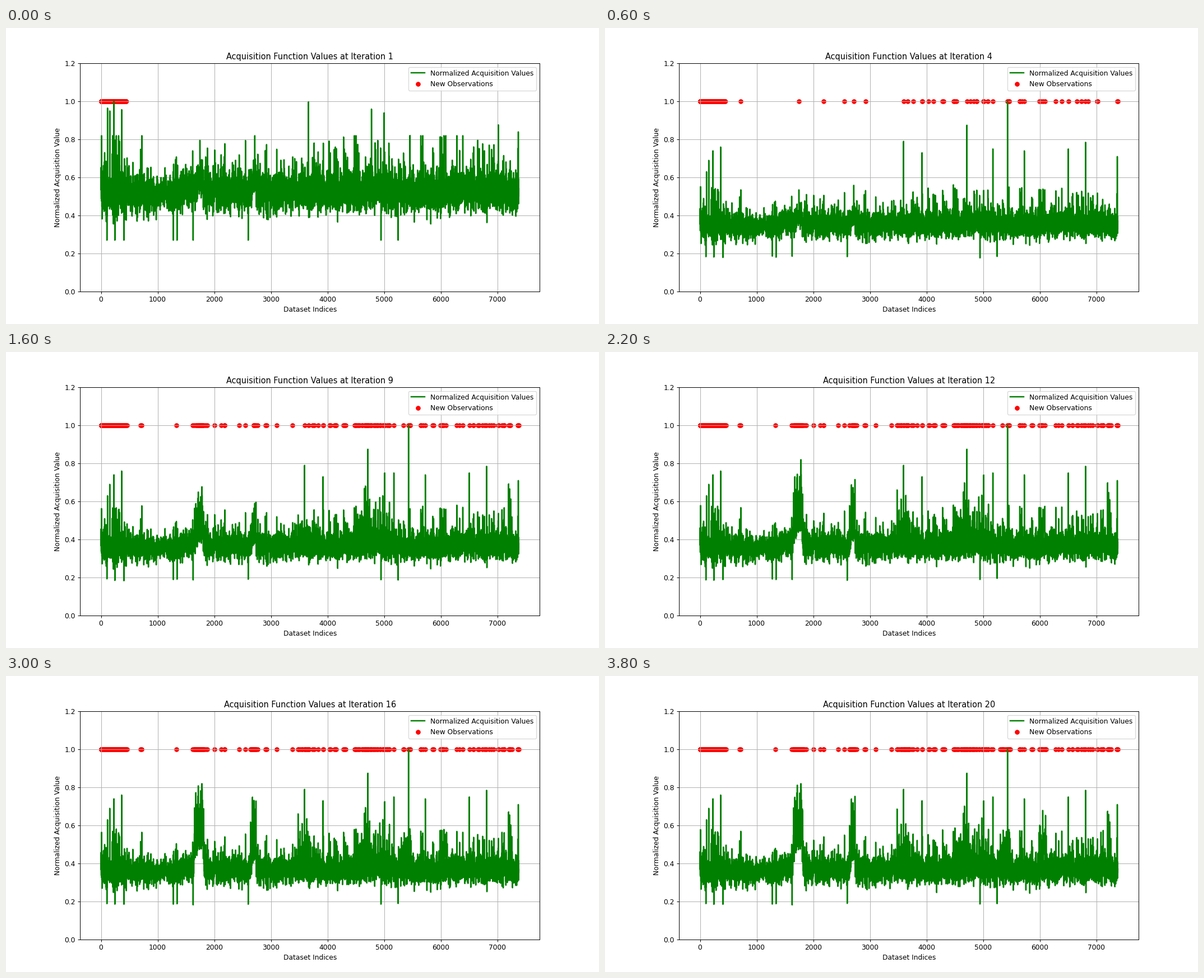
Recreate the animation shown at these times as a matplotlib script. Size 1058x529 px, loop 4000 ms.

```python
import numpy as np
import matplotlib.pyplot as plt
from matplotlib.animation import FuncAnimation

N = 7380
STEPS = 20
START = 441          # samples observed before the first step
BATCH = 16           # samples observed per step
PEAK = 5431          # maximum from step 2 on
idx = np.arange(N)
rng = np.random.default_rng(11)

# (sample, height) of the few landmark spikes
FIRST = [(115, .965), (155, .95), (228, 1), (365, .957), (3665, .998),
         (4777, .96), (5000, .94), (7017, .877), (7370, .84)]
LATER = [(115, .63), (155, .69), (228, .74), (365, .76), (3595, .79),
         (3921, .73), (4713, .875), (PEAK, 1), (5173, .75), (5728, .74),
         (6505, .75), (6810, .785), (7370, .71)]
DIPS = [105, 245, 405, 1277, 1343, 1627, 2600, 4945, 5247]

# stretches that grow spikes: from, to, height, power, first step
CLUSTERS = [(1640, 1830, .29, 7, 4), (2635, 2748, .28, 7, 6),
            (3470, 3720, .31, 14, 5), (4520, 5180, .28, 22, 2),
            (5300, 5480, .25, 12, 10), (6000, 6120, .32, 14, 11),
            (7080, 7260, .34, 16, 2)]


def ramp(x, a, b):
    return np.clip((x - a) / (b - a), 0, 1)


def box(a, b, soft=8):
    return ramp(idx, a - soft, a + soft) * (1 - ramp(idx, b - soft, b + soft))


def put(values, spikes):
    for i, height in spikes:
        values[i] = height
    return values


def make_base():
    # spread differs by region and wanders slowly along the axis
    up = 1 + .4 * box(0, 440) - .15 * box(440, 1250) + .22 * box(3480, N + 50)
    down = 1 + .35 * box(0, 440)
    knots = np.arange(0, N + 40, 40)
    up *= np.interp(idx, knots, rng.lognormal(0, .16, len(knots)))
    down *= np.interp(idx, knots, rng.lognormal(0, .1, len(knots)))

    z = rng.normal(size=N)
    tail = rng.exponential(.055, N) * (rng.random(N) < .05)
    dip = rng.exponential(.035, N) * (rng.random(N) < .012)
    rare = .24 * rng.random(N) ** 60
    noise = np.where(z < 0, .045 * down * z - dip, .043 * up * z + up * tail)
    centre = (.52 + .08 * box(1705, 1800) + .065 * box(2665, 2740)
              + .03 * box(2000, 2050) + .015 * box(1420, 1700))
    base = np.clip(centre + noise + up * rare, .31, .82)
    return put(base, [(i, .27) for i in DIPS])


base = make_base()
mix = rng.random(N)


def growth(k):
    extra = (.12 * ramp(k, 7, 15) * box(1645, 1820)
             + .05 * ramp(k, 7, 14) * box(2645, 2742))
    for a, b, height, power, start in CLUSTERS:
        extra += height * ramp(k, start, start + 7) * mix ** power * box(a, b)
    return extra


def acquisition(k):
    if k == 1:
        return put(base.copy(), FIRST)
    scale = .67 + .025 * ramp(k, 4, 7)
    wobble = np.random.default_rng(k).normal(1, .015, N)
    values = np.minimum((scale * base + growth(k)) * wobble, .82)
    return put(values, LATER)


def observe():
    """Each step observes the best samples of the step before."""
    seen = np.zeros(N, bool)
    seen[:START] = True
    history = [np.flatnonzero(seen)]
    for k in range(1, STEPS):
        score = np.where(seen, -1, acquisition(k))
        seen[np.argsort(score)[-BATCH:]] = True
        seen[-1] = True
        history.append(np.flatnonzero(seen))
    return history


history = observe()

fig, ax = plt.subplots(figsize=(12, 6), dpi=1058 / 12)
line, = ax.plot(idx, base, color="green", lw=2,
                label="Normalized Acquisition Values")
dots = ax.scatter([0], [1], color="red", label="New Observations")
ax.set_xlim(-.05 * (N - 1), 1.05 * (N - 1))
ax.set_ylim(0, 1.2)
ax.set_xlabel("Dataset Indices")
ax.set_ylabel("Normalized Acquisition Value")
ax.grid(True)
ax.legend(loc="upper right")
title = ax.set_title("", fontsize=11.88)


def draw(frame):
    xs = history[frame]
    line.set_ydata(acquisition(frame + 1))
    dots.set_offsets(np.column_stack([xs, np.ones(len(xs))]))
    title.set_text(f"Acquisition Function Values at Iteration {frame + 1}")
    return line, dots, title


anim = FuncAnimation(fig, draw, frames=STEPS, interval=200, repeat=True,
                     repeat_delay=0, blit=False)
plt.show()
```
